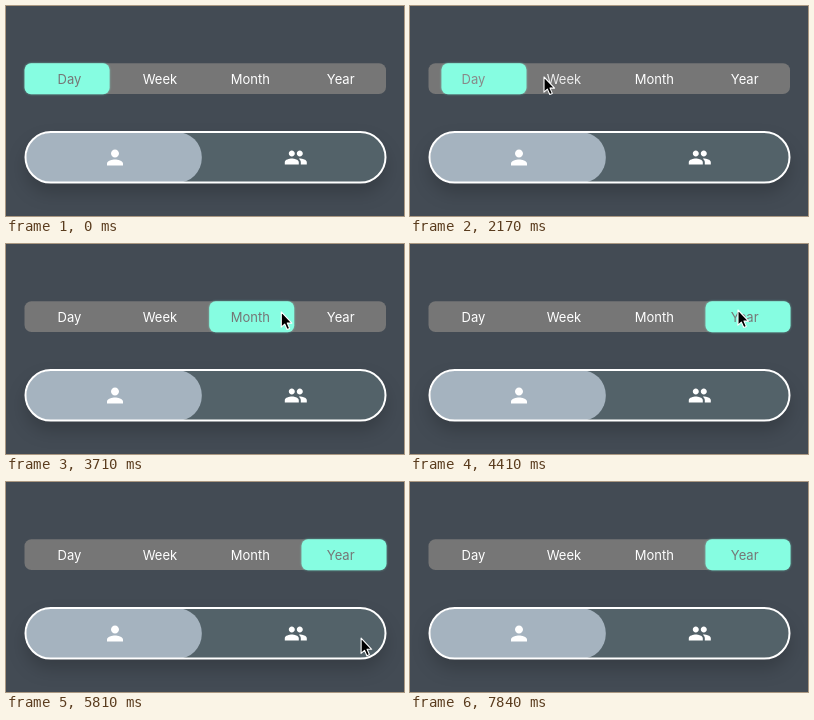
An HTML page that plays this animation: 398x210 px, repeating every 8610 ms.

```html
<!DOCTYPE html>
<html lang="en">
<head>
<meta charset="utf-8">
<title>Segmented toggles</title>
<style>
html, body { margin: 0; width: 100%; height: 100%; overflow: hidden; background: #434b54; }
svg { display: block; width: 398px; height: 210px; }
text { font: 13px Inter, Roboto, sans-serif; text-anchor: middle; }
.glow { filter: drop-shadow(0 .4px .8px #86fde188); }
.deep { filter: drop-shadow(0 10px 9px #0003); }
</style>
</head>
<body>
<svg viewBox="0 0 398 210">
  <clipPath id="capsule"><rect x="20" y="126.5" width="359" height="50" rx="25"/></clipPath>

  <rect x="18.5" y="57.3" width="361.5" height="30.7" rx="7" fill="#767676"/>
  <rect id="tab" class="glow" y="57.3" width="85" height="30.9" rx="6.5" fill="#86fde1"/>
  <g id="labels"></g>

  <rect class="deep" x="19.5" y="126.1" width="360" height="50.5" rx="25.25" fill="#536269"/>
  <g clip-path="url(#capsule)">
    <rect id="side" y="126" width="175.8" height="51" rx="25" fill="#a5b3bf"/>
  </g>
  <rect x="19.5" y="126.1" width="360" height="50.5" rx="25.25" fill="none" stroke="#fff" stroke-width="2"/>
  <g fill="#fff">
    <path transform="translate(97 139.6)" d="M12 12c2.21 0 4-1.79 4-4s-1.79-4-4-4-4 1.79-4 4 1.79 4 4 4zm0 2c-2.67 0-8 1.34-8 4v2h16v-2c0-2.66-5.33-4-8-4z"/>
    <path transform="translate(277.8 139.6)" d="M16 11c1.66 0 2.99-1.34 2.99-3S17.66 5 16 5c-1.66 0-3 1.34-3 3s1.34 3 3 3zm-8 0c1.66 0 2.99-1.34 2.99-3S9.66 5 8 5C6.34 5 5 6.34 5 8s1.34 3 3 3zm0 2c-2.33 0-7 1.17-7 3.5V19h14v-2.5c0-2.33-4.67-3.5-7-3.5zm8 0c-.29 0-.62.02-.97.05 1.16.84 1.97 1.97 1.97 3.45V19h6v-2.5c0-2.33-4.67-3.5-7-3.5z"/>
  </g>

  <path id="cursor" d="M0 0V15.2l3.4-3.1 2.4 5.4 2.5-1.1-2.3-5.3h4.6z" stroke="#fff" stroke-width="1.1" stroke-linejoin="round"/>
</svg>
<script>
const LOOP = 8610;
const $ = id => document.getElementById(id);

// Eased progress from 0 at start to 1 at end
function ease(t, start, end) {
  const p = Math.min(1, Math.max(0, (t - start) / (end - start)));
  return p * p * (3 - 2 * p);
}

const slide = (t, click) => ease(t, click, click + 260);

const move = (start, end, x, y) => ({ start, end, x, y });
const moves = [
  move(0, 630, 77, 77),
  move(720, 1190, 134, 71),     // Week
  move(2400, 2870, 222, 70),    // Month
  move(3430, 3990, 328, 66),    // Year
  move(4500, 5110, 121, 180),
  move(5110, 5850, 357, 156),   // right side
  move(6310, 6600, 145, 151),   // left side
  move(7430, 7820, 160, 214)
];

const labels = ["Day", "Week", "Month", "Year"].map((word, i) => {
  const el = document.createElementNS("http://www.w3.org/2000/svg", "text");
  el.textContent = word;
  el.setAttribute("x", 63.5 + i * 90.4);
  el.setAttribute("y", 77.6);
  return $("labels").appendChild(el);
});

function draw(t) {
  const tab = slide(t, 2110) + slide(t, 3080) + slide(t, 4090);
  const side = slide(t, 5970) - slide(t, 6810);
  let x = 66, y = 214;
  for (const m of moves) {
    const p = ease(t, m.start, m.end);
    x += (m.x - x) * p;
    y += (m.y - y) * p;
  }
  $("tab").setAttribute("x", 18.6 + tab * 92.3);
  $("side").setAttribute("x", 20 + side * 183.3);
  $("cursor").setAttribute("transform", `translate(${x} ${y})`);
  labels.forEach((el, i) => {
    const shade = 255 - 137 * Math.max(0, 1 - Math.abs(tab - i));
    el.setAttribute("fill", `rgb(${shade},${shade},${shade})`);
  });
}

const start = performance.now();
function tick() {
  draw((performance.now() - start) % LOOP);
  requestAnimationFrame(tick);
}
tick();
</script>
</body>
</html>
```
